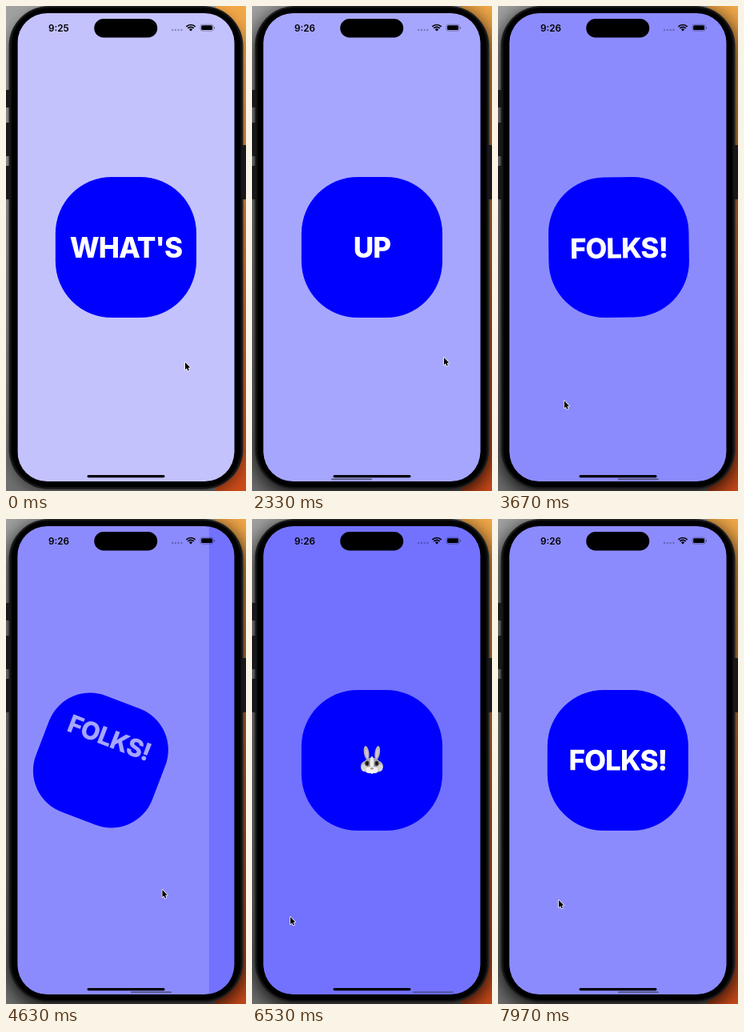
An HTML page with a canvas for the animation above (8000 ms loop, 300 px wide and 607 px high).

```html
<!DOCTYPE html>
<html lang="en">
<head>
<meta charset="utf-8">
<title>Paged scroll</title>
<style>
html, body { margin: 0; width: 100%; height: 100%; overflow: hidden; background: #000; }
canvas { display: block; width: 300px; height: 607px; }
</style>
</head>
<body>
<canvas id="stage"></canvas>
<script>
const LOOP = 8000, W = 300, H = 607;
const SCREEN = { x: 14.4, y: 9, w: 271, h: 586, r: 37 };
const MID_X = SCREEN.x + SCREEN.w / 2, MID_Y = SCREEN.y + SCREEN.h / 2;
const SIZE = SCREEN.w * 0.65, RADIUS = SIZE / 2.5, SLOP = 8;
const PAGES = [
  { color: '#c3c2fd', word: "WHAT'S" },
  { color: '#a7a6ff', word: 'UP' },
  { color: '#8c8bfd', word: 'FOLKS!' },
  { color: '#7372ff', word: '' }
];
// pointer stops: time, x, y
const PATH = [
  [0, 224, 446], [560, 222, 446], [1096, 60, 465], [1500, 60, 465], [2150, 240, 440],
  [2560, 240, 440], [3143, 56, 501], [3500, 56, 501], [4200, 235, 455], [4465, 235, 455],
  [5025, 48, 498], [6600, 48, 498], [7160, 225, 455], [7400, 225, 455], [7970, 76, 477], [8000, 74, 477]
];
const DRAGS = [
  { start: 560, end: 1046, from: 0, to: 1 },
  { start: 2560, end: 3090, from: 1, to: 2 },
  { start: 4465, end: 4975, from: 2, to: 3 },
  { start: 6600, end: 7110, from: 3, to: 2 }
];

const canvas = document.getElementById('stage');
const ratio = window.devicePixelRatio || 1;
canvas.width = W * ratio;
canvas.height = H * ratio;
const c = canvas.getContext('2d');

const clamp = (v, lo = 0, hi = 1) => Math.min(hi, Math.max(lo, v));
const smooth = u => u * u * (3 - 2 * u);

function pointer(t) {
  let i = 0;
  while (i < PATH.length - 2 && t >= PATH[i + 1][0]) i++;
  const a = PATH[i], b = PATH[i + 1];
  const u = smooth(clamp((t - a[0]) / (b[0] - a[0])));
  return { x: a[1] + (b[1] - a[1]) * u, y: a[2] + (b[2] - a[2]) * u };
}

function dragged(d, t) {
  const moved = pointer(d.start).x - pointer(t).x;
  return d.from + Math.sign(moved) * Math.max(0, Math.abs(moved) - SLOP) / SCREEN.w;
}

// follows the pointer while held, then springs to the next page
function scroll(t) {
  const d = DRAGS.filter(d => t >= d.start).pop();
  if (!d) return { pos: 0, bar: 0 };
  if (t <= d.end) return { pos: dragged(d, t), bar: clamp((t - d.start) / 100) };
  const k = 0.011, s = t - d.end;
  const gap = dragged(d, d.end) - d.to;
  const speed = (dragged(d, d.end) - dragged(d, d.end - 5)) / 5;
  return {
    pos: d.to + (gap + (speed + k * gap) * s) * Math.exp(-k * s),
    bar: 1 - clamp((s - 1520) / 300)
  };
}

function box(x, y, w, h, r, fill) {
  c.beginPath();
  c.roundRect(x, y, w, h, r);
  c.fillStyle = fill;
  c.fill();
}

function dot(x, y, rx, ry, fill, turn = 0) {
  c.beginPath();
  c.ellipse(x, y, rx, ry, turn, 0, 7);
  c.fillStyle = fill;
  c.fill();
}

function strip(x, w, colors) {
  const g = c.createLinearGradient(0, 0, 0, H);
  colors.forEach((color, i) => g.addColorStop(i / (colors.length - 1), color));
  c.fillStyle = g;
  c.fillRect(x, 0, w, H);
}

function phone(focused) {
  strip(0, 262, ['#a2a2a2', '#989898', '#8a8a8a', '#707070']);
  strip(262, 38, ['#f2a848', '#de8a3c', '#d0642c', '#cc4a1a']);
  c.shadowColor = focused ? 'rgba(0,0,0,.95)' : 'rgba(0,0,0,.4)';
  c.shadowBlur = (focused ? 26 : 16) * ratio;
  c.shadowOffsetY = 6 * ratio;
  box(3.5, 0, 293, 605, 50, '#222224');
  c.shadowColor = 'transparent';
  for (const [y, h] of [[105, 22], [146, 42], [200, 42]]) box(0, y, 5, h, 1, '#19191b');
  box(295, 174, 5, 68, 1, '#19191b');
  box(5, 1.2, 290, 602.4, 48.5, '#111112');
  box(7, 2.5, 286, 599.5, 46.5, '#000');
}

function rabbit() {
  for (const s of [-1, 1]) {
    dot(s * 6.8, -9.5, 3.2, 8.6, '#b4b4b6', s * 0.15);
    dot(s * 6.5, -8.5, 1.4, 6, '#d9c3c6', s * 0.15);
  }
  dot(0, 7.5, 14, 8.8, '#b8b8ba');
  dot(0, 5.5, 10.5, 9, '#a9a9ab');
  dot(0, 3, 2.3, 8, '#eee');
  for (const s of [-1, 1]) {
    dot(s * 9.5, 9.5, 4, 4.5, '#d6d6d8');
    dot(s * 6, 4, 2.8, 3.4, '#5a554e');
    dot(s * 6, 3.8, 1.6, 2.2, '#111');
    dot(s * 3.2, 12.2, 4, 4, '#f2f2f2');
  }
  dot(0, 10.2, 1.9, 1.3, '#b98a8a');
  box(-1.3, 14, 2.6, 2.8, 0.6, '#fff');
}

function square(page, d) {
  const near = clamp(1 - Math.abs(d));
  if (!near) return;
  c.save();
  c.translate(MID_X - d * SCREEN.w, MID_Y);
  c.rotate(d * Math.PI);
  c.scale(near, near);
  box(-SIZE / 2, -SIZE / 2, SIZE, SIZE, RADIUS * near, '#00f');
  c.globalAlpha = clamp(1 - 3 * Math.abs(d));
  c.translate(0, -d * SCREEN.h / 2);
  if (page.word) {
    c.font = '800 35px Inter, sans-serif';
    c.letterSpacing = '-1px';
    c.textAlign = 'center';
    c.fillStyle = '#fff';
    c.fillText(page.word, 0, 12.5);
  } else rabbit();
  c.restore();
}

function statusBar(time) {
  c.font = '600 11.7px Inter, sans-serif';
  c.textAlign = 'left';
  c.fillStyle = '#000';
  c.fillText(time, 53, 31.5);
  box(110.2, 16, 79, 23.5, 11.75, '#000');
  for (let i = 0; i < 4; i++) dot(208 + i * 3.8, 30, 1.2, 1.2, 'rgba(0,0,0,.28)');
  c.strokeStyle = '#000';
  c.lineWidth = 1.7;
  for (const r of [8, 5.2]) {
    c.beginPath();
    c.arc(231, 31.5, r, -Math.PI * 0.75, -Math.PI * 0.25);
    c.stroke();
  }
  c.beginPath();
  c.moveTo(231, 31.5);
  c.arc(231, 31.5, 3, -Math.PI * 0.75, -Math.PI * 0.25);
  c.fillStyle = '#000';
  c.fill();
  c.lineWidth = 0.7;
  c.strokeStyle = 'rgba(0,0,0,.45)';
  c.beginPath();
  c.roundRect(243, 23.2, 16, 8, 2.4);
  c.stroke();
  box(244.1, 24.3, 13.8, 5.8, 1.5, '#000');
  box(260, 25.9, 1, 2.6, 0.5, 'rgba(0,0,0,.5)');
}

function arrow({ x, y }) {
  const shape = [[0, 0], [0, 9.2], [2, 7.3], [3.5, 10.6], [4.9, 10], [3.6, 6.7], [6.3, 6.6]];
  c.beginPath();
  shape.forEach(([dx, dy]) => c.lineTo(x + dx, y + dy));
  c.closePath();
  c.lineJoin = 'round';
  c.lineWidth = 1.4;
  c.strokeStyle = '#fff';
  c.stroke();
  c.fillStyle = '#000';
  c.fill();
}

function draw(t) {
  const { pos, bar } = scroll(t);
  c.setTransform(ratio, 0, 0, ratio, 0, 0);
  phone(t >= 560);
  c.save();
  c.beginPath();
  c.roundRect(SCREEN.x, SCREEN.y, SCREEN.w, SCREEN.h, SCREEN.r);
  c.clip();
  PAGES.forEach((page, i) => {
    const left = SCREEN.x + (i - pos) * SCREEN.w;
    c.fillStyle = page.color;
    c.fillRect(left, SCREEN.y, SCREEN.w + 1, SCREEN.h);
  });
  PAGES.forEach((page, i) => square(page, pos - i));
  box(48 + pos * 51, 591.2, 51, 2, 1, `rgba(60,60,80,${0.65 * bar})`);
  c.restore();
  statusBar(t < 500 ? '9:25' : '9:26');
  box(101.5, 587, 97, 3.2, 1.6, '#000');
  arrow(pointer(t));
}

const begin = performance.now();
function tick() {
  draw((performance.now() - begin) % LOOP);
  requestAnimationFrame(tick);
}
tick();
</script>
</body>
</html>
```
